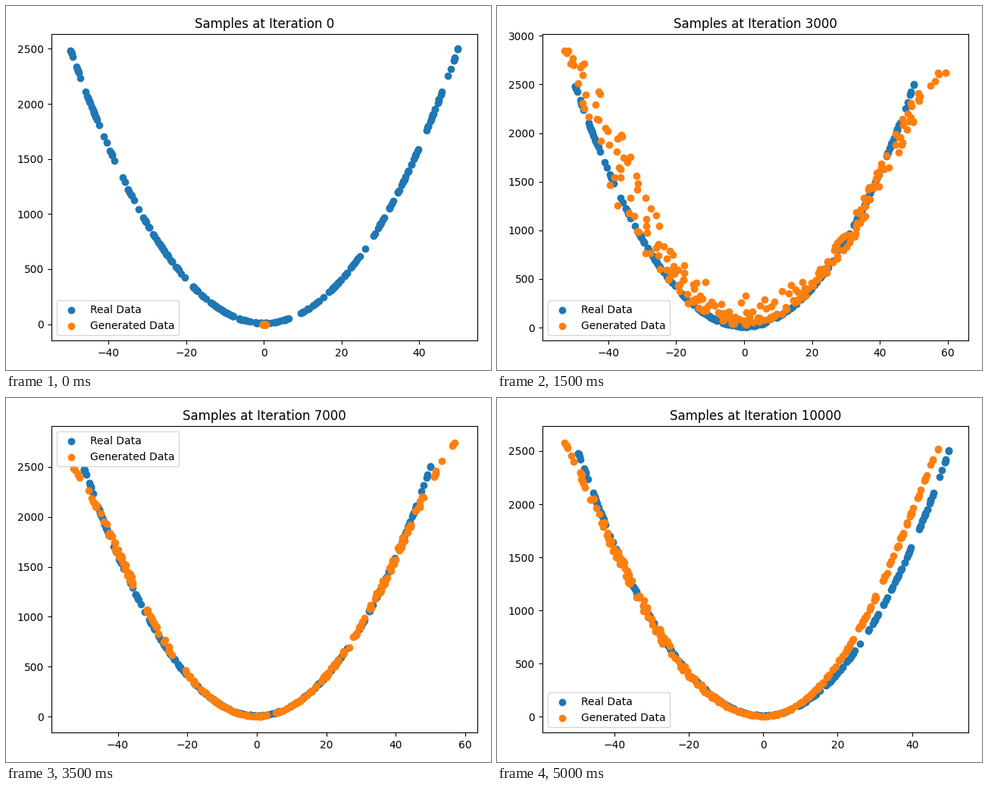
Animation, 640 px wide and 480 px high, one loop 5500 ms. Source, as a matplotlib script:

```python
import numpy as np
import matplotlib.pyplot as plt
from matplotlib.animation import FuncAnimation

W, H, DPI = 640, 480, 100
LEFT, RIGHT, TOP, BOTTOM = 59.72, 622, 37.33, 441.28
FRAMES, STEP, INTERVAL = 11, 1000, 500
COUNT = 256

# Learned curve: iteration -> left arm, right arm,
# each as (end x, end y, curvature near the middle, relative scatter)
ARMS = {
    3000: [(-52.8, 2845, 1.22, 0.60), (59.4, 2610, 0.98, 0.16)],
    5000: [(-53.6, 2490, 1.06, 0.16), (50.7, 2760, 1.34, 0.08)],
    7000: [(-52.7, 2480, 1.06, 0.06), (57.0, 2740, 1.02, 0.05)],
    9000: [(-51.0, 2470, 1.09, 0.04), (52.0, 2610, 1.12, 0.03)],
    10000: [(-53.4, 2575, 1.00, 0.10), (47.0, 2520, 1.24, 0.03)],
}


def spaced(rng, lo, hi):
    """Random x from lo to hi, thinner at both ends."""
    u = np.append(rng.random(COUNT - 2), [0, 1])
    return np.interp(u, [0, 0.04, 0.96, 1], [lo, 0.85 * lo, 0.85 * hi, hi])


def real_samples():
    x = np.random.default_rng(5).uniform(-49.7, 49.95, COUNT)
    x[:2] = -49.7, 49.95
    return x, x**2 + 10


def blob(rng):
    """Untrained output: a dot at the origin."""
    return rng.uniform(-0.25, 0.45, COUNT), rng.uniform(-3, 0, COUNT)


def cloud(rng):
    """Early output: points between a rough valley and a falling ceiling."""
    x = spaced(rng, -49, 62)
    wall = 1600 * (np.clip(-x - 10, 0, None) / 39) ** 1.8
    low = 150 + 3 * np.clip(x, 0, None) + wall
    high = 400 + 1350 / (1 + np.exp((x - 35) / 3.5))
    return x, low + (high - low) * rng.random(COUNT) ** 1.5


def arms_at(iteration):
    keys = list(ARMS)
    rows = np.array([np.ravel(a) for a in ARMS.values()])
    return np.array([np.interp(iteration, keys, col)
                     for col in rows.T]).reshape(2, 4)


def valley(rng, iteration):
    """Near-parabola whose arms bend towards their end points."""
    arms = arms_at(iteration)
    x = spaced(rng, *arms[:, 0])
    end_x, end_y, curve, scatter = arms[(x > 0).astype(int)].T
    t = x / end_x
    ratio = curve + (end_y / end_x**2 - curve) * t**6
    ratio += scatter * (1 - t**2) * rng.uniform(-1, 1, COUNT)
    lift = 65 * np.clip((5000 - iteration) / 2000, 0, 1)
    haze = lift * rng.exponential(1, COUNT) * np.exp(-(x / 20) ** 2)
    floor = 0.38 * lift * (1 - t**2) + rng.uniform(0, 8, COUNT)
    return x, ratio * x**2 + haze + floor


def halfway(rng):
    """Cloud collapsing into the valley, matched from left to right."""
    pairs = [np.array(p)[:, np.argsort(p[0])]
             for p in (cloud(rng), valley(rng, 3000))]
    return sum(pairs) / 2


def generated(iteration):
    rng = np.random.default_rng(40 + iteration)
    if iteration == 0:
        return blob(rng)
    if iteration == 1000:
        return cloud(rng)
    if iteration == 2000:
        return halfway(rng)
    return valley(rng, iteration)


def limits(real, made):
    """Data range with room for the generated markers, plus 5 % margins."""
    room = 0.008 * np.ptp(np.append(real, made))
    lo = min(real.min(), made.min() - room)
    hi = max(real.max(), made.max() + room)
    margin = 0.05 * (hi - lo)
    return lo - margin, hi + margin


fig = plt.figure(figsize=(W / DPI, H / DPI), dpi=DPI)
ax = fig.add_axes([LEFT / W, 1 - BOTTOM / H,
                   (RIGHT - LEFT) / W, (BOTTOM - TOP) / H])
REAL = real_samples()


def draw(i):
    iteration = i * STEP
    made = generated(iteration)
    ax.clear()
    ax.scatter(*REAL, label="Real Data")
    ax.scatter(*made, label="Generated Data")
    ax.set(xlim=limits(REAL[0], made[0]), ylim=limits(REAL[1], made[1]),
           title=f"Samples at Iteration {iteration}")
    ax.legend(loc="upper left" if 5000 <= iteration <= 7000 else "lower left")
    return ax.get_children()


anim = FuncAnimation(fig, draw, frames=FRAMES, init_func=lambda: [],
                     interval=INTERVAL, repeat=True, repeat_delay=0)
plt.show()
```
